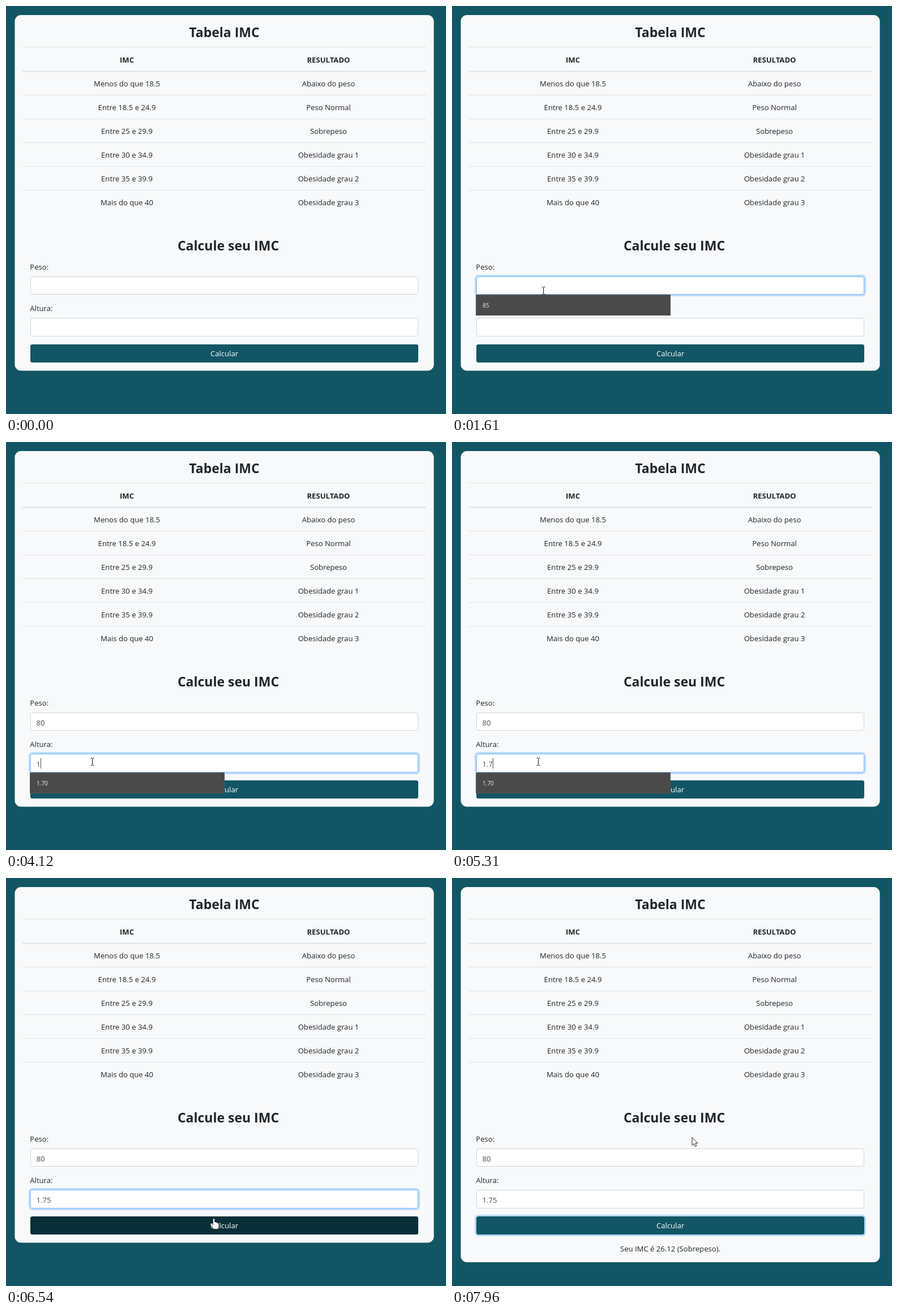
Animation of 777 by 721 pixels, one loop 8000 ms. Source, as an HTML page:

```html
<!DOCTYPE html>
<html lang="pt-BR">
<head>
<meta charset="utf-8">
<title>Tabela IMC</title>
<style>
  html, body { margin: 0; width: 100%; height: 100%; overflow: hidden; background: #125665; }
  svg { display: block; width: 777px; height: 721px; }
  text { font: 13.1px "Open Sans", "Noto Sans", sans-serif; fill: #212529; white-space: pre; }
  .mid { text-anchor: middle; }
  .bold { font-weight: 700; }
  .title { font-size: 23px; font-weight: 700; }
  .value { fill: #495057; }
  .hint { font-size: 10px; fill: #f2f2f2; }
  .light { fill: #fff; }
</style>
</head>
<body>
<svg id="stage" viewBox="0 0 777 721" xmlns="http://www.w3.org/2000/svg"></svg>
<script>
const LOOP = 8000, BLINK = 530;
const stage = document.getElementById('stage');

function set(node, attrs) {
  for (const key in attrs) node.setAttribute(key, attrs[key]);
  return node;
}
function add(tag, attrs, parent = stage) {
  const node = document.createElementNS('http://www.w3.org/2000/svg', tag);
  parent.appendChild(node);
  return set(node, attrs);
}
function rect(x, y, width, height, fill, rx = 0) {
  return add('rect', { x, y, width, height, fill, rx });
}
function label(x, y, content, cls = '') {
  const node = add('text', { x, y, class: cls });
  node.textContent = content;
  return node;
}
function show(node, visible) {
  node.style.display = visible ? '' : 'none';
}
function focusRing(y, height) {
  return add('rect', { x: 41.5, y: y - 1.5, width: 688, height: height + 3, rx: 5,
    fill: 'none', stroke: '#007bff', 'stroke-opacity': .25, 'stroke-width': 3 });
}

// Page
rect(0, 0, 777, 721, '#125665');
const card = rect(15.5, 16, 740, 628.5, '#f8f9fa', 11);
label(385.5, 55, 'Tabela IMC', 'title mid');
rect(29, 72, 713, 1, '#dee2e6');
rect(29, 114.5, 713, 2, '#dee2e6');
label(213.5, 99.5, 'IMC', 'bold mid');
label(569.5, 99.5, 'RESULTADO', 'bold mid');
[
  ['Menos do que 18.5', 'Abaixo do peso'],
  ['Entre 18.5 e 24.9', 'Peso Normal'],
  ['Entre 25 e 29.9', 'Sobrepeso'],
  ['Entre 30 e 34.9', 'Obesidade grau 1'],
  ['Entre 35 e 39.9', 'Obesidade grau 2'],
  ['Mais do que 40', 'Obesidade grau 3']
].forEach(([range, result], i) => {
  const y = 142 + i * 42;
  if (i) rect(29, y - 27, 713, 1, '#dee2e6');
  label(213.5, y, range, 'mid');
  label(569.5, y, result, 'mid');
});
label(392.5, 432, 'Calcule seu IMC', 'title mid');

// Form
function makeField(name, y, height, hint, spec) {
  label(42.3, y - 12, name);
  const ring = focusRing(y, height);
  const box = add('rect', { x: 43.5, y: y + .5, width: 684, height: height - 1, rx: 3.5, fill: '#fff' });
  const value = label(53.6, y + 22.5, '', 'value');
  const caret = rect(54, y + 7.5, 1, 18.5, '#495057');
  return { y, height, hint, ring, box, value, caret, ...spec };
}
const fields = [
  makeField('Peso:', 478, 32, '85',
    { focus: 1080, blur: 3110, open: 1150, close: 2090, keys: [[2010, '8'], [2090, '80']] }),
  makeField('Altura:', 551, 33, '1.70',
    { focus: 3110, blur: 6940, open: 3180, close: 5850,
      keys: [[4120, '1'], [4440, '1.'], [5310, '1.7'], [5850, '1.75']] })
];
const buttonRing = focusRing(598, 32);
const button = rect(43, 598, 685, 32, '#125665', 3.5);
label(385.5, 619, 'Calcular', 'light mid');
const result = label(385.5, 659.5, 'Seu IMC é 26.12 (Sobrepeso).', 'mid');

for (const field of fields) {
  field.menu = add('g', {});
  const top = field.y + field.height;
  const back = rect(42.5, top + .5, 343, 36, '#4a4a4a');
  set(back, { stroke: '#555' });
  field.menu.append(back, label(54, top + 22.5, field.hint, 'hint'));
}

// Pointer
const pointer = add('g', {});
const glow = add('circle', { cx: -2, cy: -1, r: 10, fill: '#fffb6e' }, pointer);
const shapes = {
  beam: add('path', { d: 'M-3-6.5H-1L0-5.5L1-6.5H3M0-5.5V5.5M-3 6.5H-1L0 5.5L1 6.5H3',
    fill: 'none', stroke: '#111' }, pointer),
  hand: add('path', { d: 'M-1.5 1Q0-2 1.5 1V6Q3.6 5 4.2 6.8Q6.2 6 6.8 7.8Q9 7.2 9 9.5V13Q9 16 7.5 18.5H-.5Q-1.5 16-4 13L-6.2 10Q-6.5 8-4.5 8.3L-1.5 10.8Z',
    fill: '#fff', stroke: '#000', 'stroke-width': .6 }, pointer),
  arrow: add('path', { d: 'M0 0V14L3.2 11L5.4 16L7.8 15L5.6 10.2H10Z',
    fill: '#fff', stroke: '#111', 'stroke-width': .9 }, pointer)
};

const linear = u => u;
const easeOut = u => 1 - (1 - u) ** 2;
const START = [350, 775];
const moves = [
  { from: 210, until: 370, count: 3, to: [250, 552] },
  { from: 450, until: 1000, count: 8, to: [161, 503], ease: easeOut },
  { from: 2640, until: 2940, count: 5, to: [152, 565] },
  { from: 6080, until: 6540, count: 7, to: [367, 602], bend: [230, 515] },
  { from: 6620, until: 6710, count: 2, to: [378, 621] },
  { from: 7100, until: 7350, count: 4, to: [400, 488], ease: easeOut },
  { from: 7580, until: 7960, count: 6, to: [424, 458.5], ease: easeOut }
];

// The pointer advances in discrete steps, as a screen recorder samples it.
function pointerAt(t) {
  let at = START;
  for (const { from, until, count, to, bend, ease = linear } of moves) {
    if (t < from) break;
    const gap = (until - from) / (count - 1);
    const step = Math.min(count, Math.floor((t - from) / gap + 1e-6) + 1);
    const u = ease(step / count), start = at;
    at = to.map((end, i) => {
      const mid = bend ? bend[i] : (start[i] + end) / 2;
      return (1 - u) ** 2 * start[i] + 2 * u * (1 - u) * mid + u * u * end;
    });
  }
  return at;
}

const between = (t, a, b) => t >= a && t < b;

function drawField(field, t) {
  const focused = between(t, field.focus, field.blur);
  let text = '', since = field.focus;
  for (const [time, typed] of field.keys) {
    if (t >= time) { text = typed; since = time; }
  }
  field.value.textContent = text;
  show(field.ring, focused);
  set(field.box, { stroke: focused ? '#80bdff' : '#ced4da' });
  show(field.caret, focused && Math.floor((t - since) / BLINK) % 2 === 0);
  const width = text ? field.value.getComputedTextLength() : 0;
  set(field.caret, { x: Math.round(53.9 + width) });
  show(field.menu, between(t, field.open, field.close));
}

function draw(t) {
  fields.forEach(field => drawField(field, t));

  const [x, y] = pointerAt(t);
  const inside = (top, height) => x > 43 && x < 728 && y >= top && y <= top + height;
  const hover = inside(598, 32);
  const kind = hover ? 'hand' : fields.some(f => inside(f.y, f.height)) ? 'beam' : 'arrow';
  for (const name in shapes) show(shapes[name], name === kind);
  const px = kind === 'beam' ? Math.round(x) + .5 : x;
  set(pointer, { transform: `translate(${px} ${y})` });
  show(pointer, t >= 210);
  show(glow, between(t, 1000, 1150) || between(t, 3110, 3260) || between(t, 6940, 7020));

  set(button, { fill: hover ? '#092f38' : '#125665' });
  show(buttonRing, t >= 6940);
  show(result, t >= 7020);
  set(card, { height: t >= 7020 ? 663 : 628.5 });
}

const begin = performance.now();
function tick() {
  draw((performance.now() - begin) % LOOP);
  requestAnimationFrame(tick);
}
draw(0);
requestAnimationFrame(tick);
</script>
</body>
</html>
```
